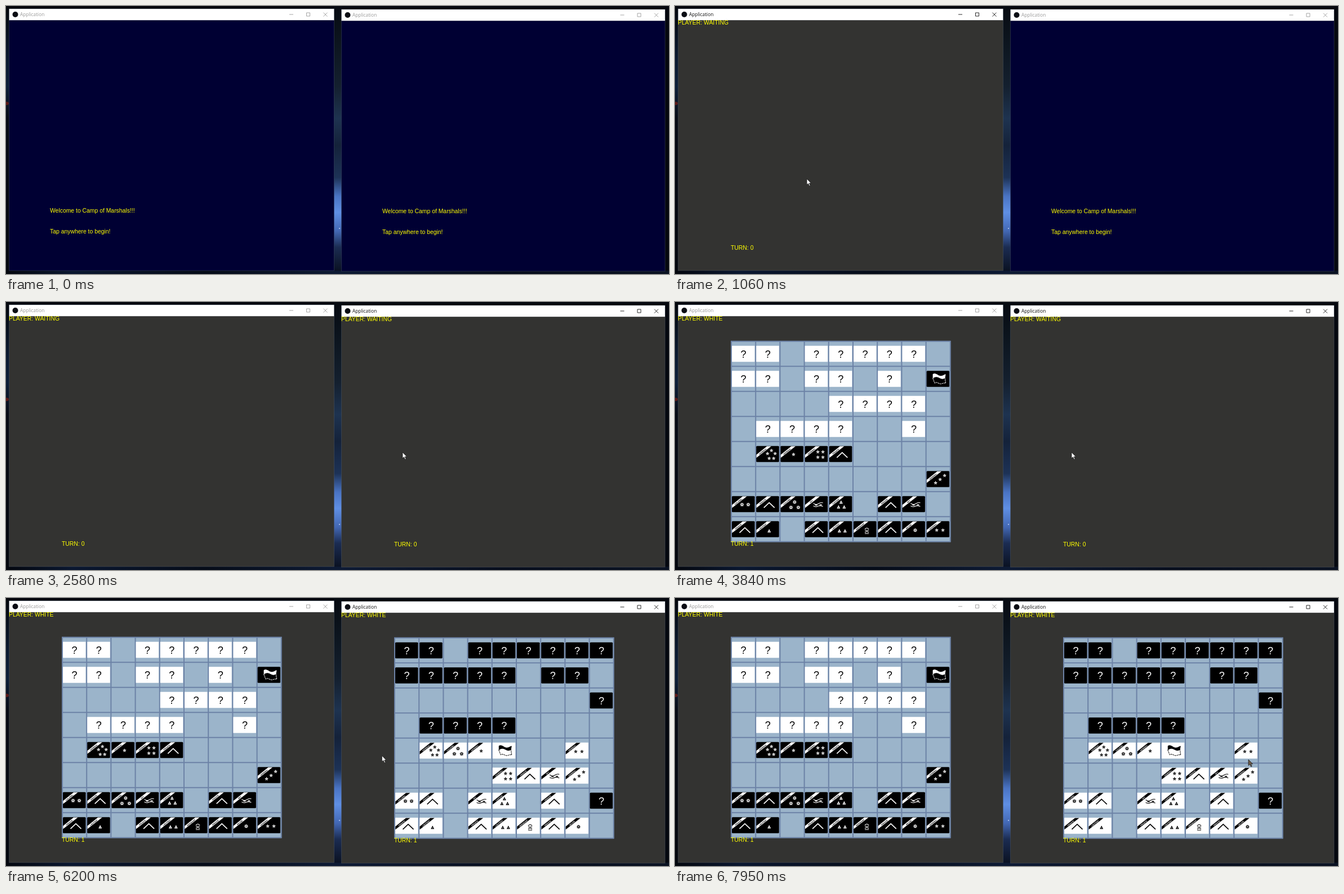
These frames come from a looping animation (1177x476 px, 8 s). An HTML page:

```html
<!DOCTYPE html>
<html lang="en">
<head>
<meta charset="utf-8">
<title>Two-player board game</title>
<style>
  html, body { margin: 0; width: 100%; height: 100%; overflow: hidden; background: #05080f; }
  svg { display: block; width: 1177px; height: 476px; }
  .caption { font: 8.3px "Open Sans", "Noto Sans", sans-serif; }
  .game { font: 10.4px "Liberation Sans", Arial, sans-serif; fill: #ff0; }
  .mark { font: 18px "Liberation Sans", Arial, sans-serif; text-anchor: middle; }
  .rank { font: bold 3.4px "Liberation Sans", Arial, sans-serif; text-anchor: middle; }
</style>
</head>
<body>
<svg id="stage" viewBox="0 0 1177 476" xmlns="http://www.w3.org/2000/svg"></svg>
<script>
const LOOP = 8000;
const stage = document.getElementById('stage');

// Board rows: ? hidden, 1-5 generals, x-z officers, a-c captains and lieutenants,
// ^ private, s spy, g sergeant, F flag
const LEFT = ['??.?????.', '??.??.?.F', '....????.', '.????..?.', '.514^....',
              '........3', 'y^zsc.^s.', '^a.^bg^x2'];
const RIGHT = ['??.??????', '?????.??.', '........?', '.????....', '.5z1F..2.',
               '....4^s3.', 'y^.sc.^.?', '^a.^bg^x.'];

const RANKS = { 1: 'GENERAL', 2: 'GENERAL', 3: 'GENERAL', 4: 'GENERAL', 5: 'GENERAL',
  x: 'MAJOR', y: 'COLONEL', z: 'COLONEL', a: 'LIEUTENT', b: 'LIEUTENT', c: 'CAPTAIN',
  '^': 'PRIVATE', s: 'SPY', g: 'SERGEANT' };

const SPOTS = {
  1: [[23, 15]],
  2: [[18, 16], [29, 16]],
  3: [[16, 21], [24, 15], [32, 8]],
  4: [[23, 10.5], [32, 10.5], [23, 20], [32, 20]],
  5: [[27, 8], [20, 13.5], [33.5, 13.5], [23, 22], [31, 22]],
  x: [[23, 16]],
  y: [[18, 15], [29, 15]],
  z: [[25, 10.5], [18.5, 20], [31.5, 20]],
  a: [[23, 17]],
  b: [[18, 17], [28, 17]],
  c: [[21, 10.5], [16.5, 19], [26.5, 19]]
};

function spikes([x, y], n, outer, inner) {
  const pts = [];
  for (let i = 0; i < n * 2; i++) {
    const r = i % 2 ? inner : outer, a = i * Math.PI / n - Math.PI / 2;
    pts.push(`${(x + r * Math.cos(a)).toFixed(2)},${(y + r * Math.sin(a)).toFixed(2)}`);
  }
  return `<polygon points="${pts.join(' ')}"/>`;
}

const dot = ([x, y], r, fill) => `<circle cx="${x}" cy="${y}" r="${r}" fill="${fill}"/>`;
const line = (d, ink, w = 1, more = '') =>
  `<path d="${d}" fill="none" stroke="${ink}" stroke-width="${w}" ${more}/>`;

function emblem(kind, ink, paper) {
  const spots = SPOTS[kind] || [];
  if ('12345'.includes(kind)) return spots.map(p => spikes(p, 5, 3.5, 1.5) + dot(p, .6, paper)).join('');
  if ('xyz'.includes(kind)) return spots.map(p => spikes(p, 8, 4, 2) + dot(p, 1, paper)).join('');
  if ('abc'.includes(kind)) return spots.map(([x, y]) =>
    `<path d="M${x - 3},${y + 3}h6l-3,-6z"/>` + dot([x, y + 1], .7, paper)).join('');
  if (kind === '^') return line('M13.5,20.5L23,11.5L32.5,20.5', ink, 1.6);
  if (kind === 's') return line('M15,12.5q4,4 9,1t8,-1.5M15,17.5q4,2.5 8,.5t9,.5', ink, 1.1) +
    line('M18,16h4M26,15.5h4', ink, 1.6);
  if (kind === 'g') return line('M20,14.5q3.5,-4.5 7,0M20,16.5h7M20,20l3.5,-2l3.5,2M20,22h7', ink, 1.1);
  return '<path d="M11,6C16,2 20,9 25,9S31,6 34,6L33,12C28,18 22,11 18,11S13,12 11,14Z"/>' +
    line('M11,13L14.5,22C18,18 22,24 26,23S31,21 34,22L32.5,12', ink, 1, 'stroke-dasharray="3 .8"');
}

function piece(kind, x, y, ink, paper) {
  const flip = kind === '?';
  const [fg, bg] = flip ? [paper, ink] : [ink, paper];
  let s = `<g transform="translate(${x},${y})" fill="${fg}">` +
    `<rect width="40.5" height="28.5" rx="${bg === '#000' ? 1.5 : .3}" fill="${bg}"/>`;
  if (flip) return s + '<text class="mark" x="20.5" y="20.8">?</text></g>';
  if (RANKS[kind]) s += '<path d="M.3,15.5L19,.5H26.5L.3,21Z"/>' +
    `<text class="rank" fill="${bg}" transform="translate(12.3,10.7) rotate(-38.5)">${RANKS[kind]}</text>`;
  return s + emblem(kind, fg, bg) + '</g>';
}

function board(rows, ink, paper) {
  const px = 43.2, py = 44.5;
  let d = '';
  for (let i = 0; i < 10; i++) d += `M${100 + px * i},69V426`;
  for (let j = 0; j < 9; j++) d += `M99,${69.8 + py * j}H489.5`;
  let s = '<rect x="99" y="69" width="390" height="357" fill="#9bb4ca"/>' + line(d, '#6c82a6', 2);
  rows.forEach((row, j) => [...row].forEach((kind, i) => {
    if (kind !== '.') s += piece(kind, 101 + px * i, 77.8 + py * j, ink, paper);
  }));
  return s;
}

const label = (x, y, text, id = '') => `<text class="game" x="${x}" y="${y}" id="${id}">${text}</text>`;

function appWindow(id, dx, dy, right, rows, ink, paper) {
  const w = right - 5.5;
  return `<g transform="translate(${dx},${dy})">
    <rect x="5.5" y="5" width="${w}" height="20.5" fill="#fff"/>
    <circle cx="16.5" cy="15" r="5" fill="#0b0d14"/>
    <g id="${id}Bar"><text class="caption" x="25" y="18.4">Application</text>
      <path d="M${right - 79.5},15h7M${right - 49},12h6v6h-6zM${right - 19},11.7l7,7m0,-7l-7,7" fill="none" stroke-width=".9"/></g>
    <rect id="${id}Body" x="5.5" y="25.5" width="${w}" height="444.5"/>
    <rect x="5.5" y="5" width="${w}" height="465" fill="none" stroke="#5b6678" stroke-opacity=".45" stroke-width=".8"/>
    <g id="${id}Intro">${label(78, 366.8, 'Welcome to Camp of Marshals!!!')}${label(78, 403.5, 'Tap anywhere to begin!')}</g>
    <g id="${id}Board">${board(rows, ink, paper)}</g>
    <g id="${id}Play">${label(5, 33.2, '', id + 'Player')}${label(99, 433, '', id + 'Turn')}</g>
  </g>`;
}

const stops = list => list.map(([o, c]) => `<stop offset="${o}" stop-color="${c}"/>`).join('');
const shade = (id, list, across) =>
  `<linearGradient id="${id}" x2="${across ? 1 : 0}" y2="${across ? 0 : 1}">${stops(list)}</linearGradient>`;

stage.innerHTML = `<defs>
  ${shade('gap', [[0, '#070b12'], [.15, '#0d1620'], [.3, '#14202f'], [.42, '#1e3350'], [.52, '#14223a'],
    [.64, '#1d3256'], [.71, '#4a74c4'], [.77, '#5f8fe4'], [.84, '#4368b4'], [.9, '#1b2c52'], [1, '#080e1c']])}
  ${shade('edge', [[0, '#04070c'], [.2, '#0b1a30'], [.3, '#0d1f38'], [.42, '#070b14'], [1, '#04070e']])}
  ${shade('foot', [[0, '#04070e'], [.1, '#0a1730'], [.3, '#060c18'], [.5, '#0d1a34'], [.75, '#070d1c'], [1, '#0a1222']], true)}
  </defs>
  <rect width="1177" height="476" fill="#05080f"/>
  <rect width="6" height="476" fill="url(#edge)"/>
  <rect x="582" width="14" height="476" fill="url(#gap)"/>
  <rect y="470" width="1177" height="6" fill="url(#foot)"/>
  <ellipse cx="1" cy="173" rx="4" ry="3" fill="#5a1a18"/>
  <circle cx="592" cy="395" r=".9" fill="#cfe0ff"/>
  ${appWindow('l', 0, 0, 582.5, LEFT, '#fff', '#000')}
  ${appWindow('r', 590, 1, 580, RIGHT, '#000', '#fff')}
  <circle id="click" r="8" fill="#ff0" fill-opacity=".5"/>
  <path id="cursor" d="M0,0V10.6L2.5,8.3L4.5,12.6L6.2,11.9L4.3,7.8H7.6Z" stroke="#111" stroke-width=".7"/>`;

const linear = p => p, speedUp = p => p ** 1.5, slowDown = p => 1 - (1 - p) ** 2,
      smooth = p => p * p * (3 - 2 * p);

// Pointer moves: start, end, steps, ease, from, bend, to
const MOVES = [
  [650, 860, 5, slowDown, [-10, 330], [120, 322], [234, 307]],
  [1540, 2300, 16, speedUp, [234, 307], [430, 276], [632, 278]],
  [2350, 2430, 3, slowDown, [632, 278], [672, 274], [704, 267]],
  [4720, 4890, 5, smooth, [704, 267], [692, 263], [676, 280]],
  [6200, 6570, 9, smooth, [676, 280], [550, 282], [433, 289]],
  [7030, 7720, 14, smooth, [433, 289], [650, 312], [846, 297]],
  [7770, 7820, 2, linear, [846, 297], [838, 296], [831, 294]],
  [7850, 7950, 3, linear, [831, 294], [925, 291], [1018, 287]]
];

function pointer(t) {
  const m = MOVES.filter(v => t >= v[0]).pop();
  if (!m) return [-30, 330];
  const [a, b, n, ease, p0, p1, p2] = m;
  const k = t >= b ? n : 1 + Math.floor((t - a) / (b - a) * (n - 1));
  const p = ease(k / n), q = 1 - p;
  return [0, 1].map(i => q * q * p0[i] + 2 * q * p * p1[i] + p * p * p2[i]);
}

const el = id => document.getElementById(id);
const show = (id, on) => el(id).setAttribute('visibility', on ? 'visible' : 'hidden');

function paintWindow(id, active, started, dealt) {
  const tone = active ? '#111' : '#9a9a9a';
  el(id + 'Bar').setAttribute('fill', tone);
  el(id + 'Bar').setAttribute('stroke', 'none');
  el(id + 'Bar').lastElementChild.setAttribute('stroke', tone);
  el(id + 'Body').setAttribute('fill', started ? '#333331' : '#000033');
  show(id + 'Intro', !started);
  show(id + 'Play', started);
  show(id + 'Board', dealt);
  el(id + 'Player').textContent = 'PLAYER: ' + (dealt ? 'WHITE' : 'WAITING');
  el(id + 'Turn').textContent = 'TURN: ' + (dealt ? 1 : 0);
}

function draw(t) {
  paintWindow('l', t >= 910 && t < 2430, t >= 1010, t >= 3840);
  paintWindow('r', t >= 2430, t >= 2530, t >= 5150);
  const [x, y] = pointer(t);
  const place = `translate(${x.toFixed(1)},${y.toFixed(1)})`;
  el('cursor').setAttribute('transform', place);
  el('cursor').setAttribute('fill', t > 7000 && x > 690 ? '#6b5a48' : '#fff');
  el('click').setAttribute('transform', place);
  show('click', (t >= 910 && t < 1060) || (t >= 2430 && t < 2580));
}

const begin = performance.now();
function tick() {
  draw((performance.now() - begin) % LOOP);
  requestAnimationFrame(tick);
}
tick();
</script>
</body>
</html>
```
